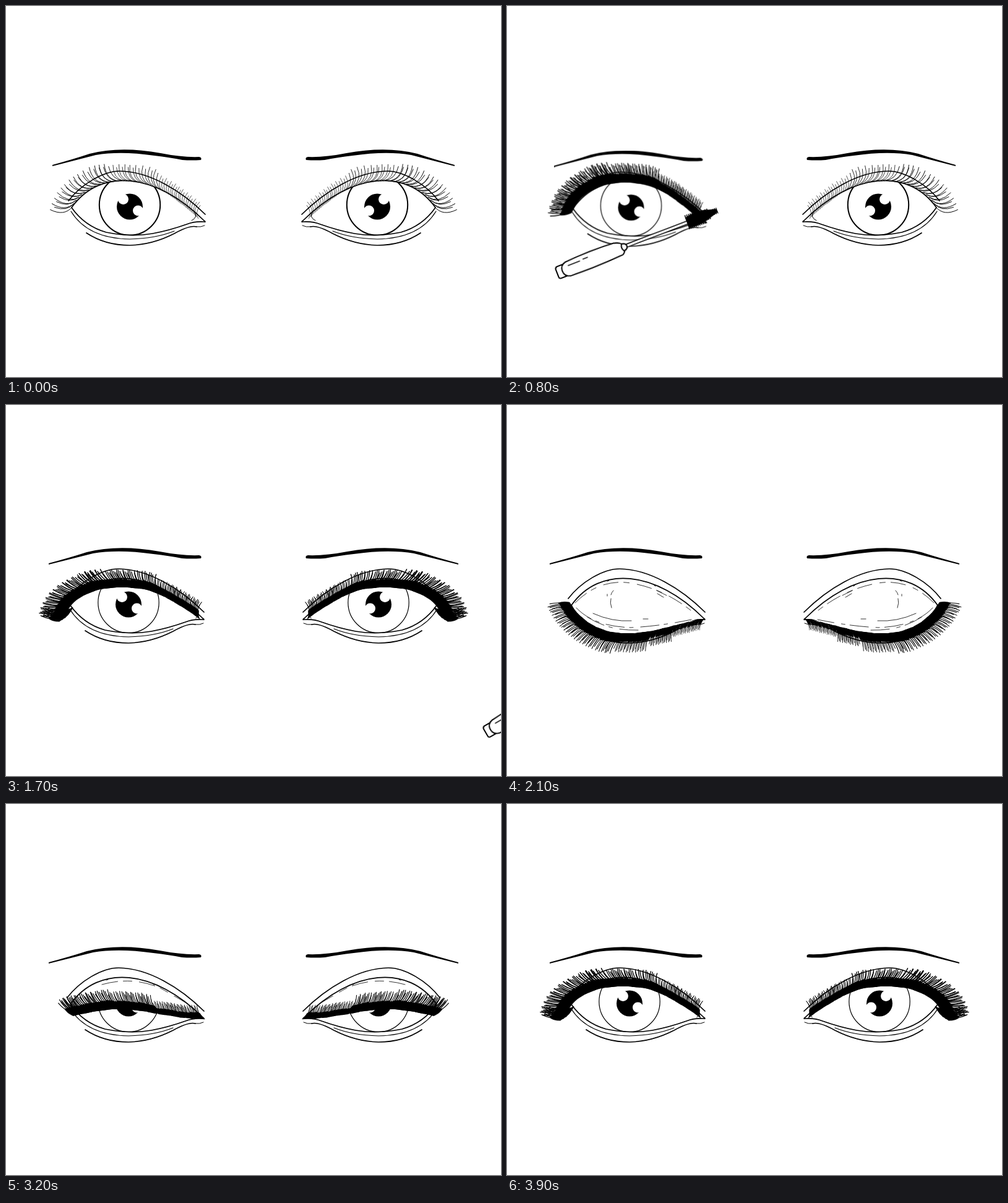
Write an HTML page without scripts that moves like this. It is 800 px wide and 600 px high and loops after 4000 ms.

```html
<!DOCTYPE html>
<html lang="en">
<head>
<meta charset="utf-8">
<title>Mascara</title>
<style>
html, body { margin: 0; width: 100%; height: 100%; overflow: hidden; background: #fff }
svg { display: block; width: 800px; height: 600px }
marker { overflow: visible }
.line { fill: none; stroke: #000; stroke-linecap: round; stroke-linejoin: round }
.skin { fill: #fff }
.bare { marker: url(#hair) }
.made { marker: url(#tuft) }
.long { marker: url(#plume) }
.down { marker: url(#drop) }

.nudge, .brow, .eye, .ball, .paint, .wand, .pose { animation: 4s step-end infinite }
.nudge { animation-name: nudge }
.brow { animation-name: brow; transform-origin: 315px 245px }
.eye { animation-name: eye }
.ball { animation-name: thin-late }
.nudge .ball { animation-name: thin-early }
.wand { animation-name: wand }
.start { animation-name: start }
.wide { animation-name: wide }
.mid { animation-name: mid }
.half { animation-name: half }
.low { animation-name: low }
.shut { animation-name: shut }
.paint.l { animation-name: paint-l; transform-origin: 50px 0 }
.paint.r { animation-name: paint-r; transform-origin: 340px 0 }

@keyframes nudge { 0%, 37.5% { transform: none } 5% { transform: translate(.5px, 1.5px) } }
@keyframes brow {
  0% { transform: none }
  37.5%, 97.5% { transform: translateY(-1px) scaleX(1.025) }
  95% { transform: translateY(-8px) scaleX(1.025) }
}
@keyframes eye { 0% { transform: translate(2px, 2px) } 37.5% { transform: none } }
@keyframes thin-early { 0% { stroke-width: 2 } 5% { stroke-width: 1.2 } }
@keyframes thin-late { 0% { stroke-width: 2 } 37.5% { stroke-width: 1.2 } }
@keyframes paint-l {
  0% { transform: scaleX(0) }
  5% { transform: scaleX(0); animation-timing-function: steps(6) }
  20%, 100% { transform: none }
}
@keyframes paint-r {
  0% { transform: scaleX(0) }
  25% { transform: scaleX(0); animation-timing-function: steps(5) }
  37.5%, 100% { transform: none }
}
@keyframes start { 0% { opacity: 1 } 37.5% { opacity: 0 } }
@keyframes wide { 0%, 47.5%, 75% { opacity: 0 } 37.5%, 65%, 97.5% { opacity: 1 } }
@keyframes mid {
  0%, 65%, 80%, 97.5% { opacity: 0; transform: none }
  62.5%, 75%, 95% { opacity: 1; transform: none }
  77.5% { opacity: 1; transform: translateY(6px) }
}
@keyframes half { 0%, 50%, 62.5%, 82.5%, 95% { opacity: 0 } 47.5%, 60%, 80%, 92.5% { opacity: 1 } }
@keyframes low { 0%, 52.5%, 60%, 85%, 92.5% { opacity: 0 } 50%, 57.5%, 82.5%, 90% { opacity: 1 } }
@keyframes shut { 0%, 57.5%, 90% { opacity: 0 } 52.5%, 85% { opacity: 1 } }
@keyframes wand {
  0%, 45% { transform: translate(-400px, 500px) }
  5% { transform: translate(45px, 325px) rotate(-21.4deg) }
  7.5% { transform: translate(95px, 312px) rotate(-21.4deg) }
  10% { transform: translate(130px, 295px) rotate(-21.4deg) }
  12.5% { transform: translate(175px, 280px) rotate(-21.4deg) }
  15% { transform: translate(222px, 282px) rotate(-21.4deg) }
  17.5% { transform: translate(265px, 298px) rotate(-21.4deg) }
  20% { transform: translate(339px, 331px) rotate(-21.4deg) }
  22.5% { transform: translate(298px, 345px) rotate(-21.4deg) }
  25% { transform: translate(440px, 350px) rotate(-21.4deg) }
  27.5% { transform: translate(520px, 325px) rotate(-21.4deg) }
  30% { transform: translate(610px, 290px) rotate(-21.4deg) }
  32.5% { transform: translate(690px, 295px) rotate(-21.4deg) }
  35% { transform: translate(735px, 320px) rotate(-22deg) }
  37.5% { transform: translate(800px, 345px) rotate(-24deg) }
  40% { transform: translate(900px, 370px) rotate(-27deg) }
  42.5% { transform: translate(1015px, 391px) rotate(-30deg) }
}
</style>
</head>
<body>
<svg viewBox="0 0 800 600">
<defs>
  <!-- Lashes grow from every vertex of a lid path; stroke-width sets their length. -->
  <marker id="hair" orient="auto">
    <path class="line" stroke-width=".8" d="M0 0Q-18-4-18-27M5 0Q-10-4-12-23"/>
  </marker>
  <g id="clump">
    <path d="M7 1H-8Q-17-6-19-14L-6-13z"/>
    <path class="line" stroke-width="1.200" d="M7 0Q-12-6-20-28M3 0Q-16-5-26-25M5 0Q-12-9-16-31M0 0Q-16-7-23-30M8 0Q-8-5-14-24"/>
  </g>
  <marker id="tuft" orient="auto"><use href="#clump"/></marker>
  <marker id="plume" orient="auto"><use href="#clump" transform="scale(1.15 1.1)"/></marker>
  <marker id="drop" orient="auto"><use href="#clump" transform="scale(.85 -1.08)"/></marker>

  <g id="lid" fill="none">
    <path stroke-width="1.100" d="M107 325 110 319 114 314 118 309 123 305 128 301 134 297 140 294 146 291 153 288 160 286 167 285 174 284 182 283"/>
    <path stroke-width=".95" d="M190 283 198 283 206 284 214 285 222 286 230 288 238 291 246 295"/>
    <path stroke-width=".75" d="M253 299 260 303 267 308 273 312 279 317 285 321 291 326 297 331 303 336 308 341"/>
  </g>
  <g id="lid-half" fill="none">
    <path d="M116 340 120 339 126 338 132 337 140 335 148 334 156 333 164 332 172 331 180 331"/>
    <path stroke-width=".88" d="M188 331 196 331 204 332 212 333 220 334 228 335 236 337 244 338"/>
    <path stroke-width=".65" d="M252 340 260 341 267 342 273 343 279 344 285 345 291 345 297 346 303 346 309 346 316 347"/>
  </g>
  <g id="lid-shut" fill="none">
    <path d="M104 325 108 331 113 337 118 342 124 347 130 352 137 356 144 360 152 363 160 366 168 368 176 369 184 370"/>
    <path stroke-width=".88" d="M192 370 200 370 208 370 216 369 224 368 232 367"/>
    <path stroke-width=".68" d="M240 365 248 363 255 361 261 360 267 358"/>
    <path stroke-width=".48" d="M273 357 279 355 285 354 291 352 297 351 303 349 309 348 315 347"/>
  </g>

  <path id="brow" d="M75 257Q108 248 135 239Q185 226 250 238Q285 245 312 244Q317 245 315 249Q300 250 285 249Q265 245 240 242Q185 234 145 241Q110 250 75 259z"/>
  <clipPath id="opening"><path d="M104 324C150 260 240 268 318 345L270 358Q200 380 150 360z"/></clipPath>
  <g id="ball" clip-path="url(#opening)">
    <circle fill="none" stroke="#000" cx="198" cy="319.500" r="49.200"/>
    <circle cx="198" cy="322.500" r="21"/>
    <g fill="#fff"><circle cx="187.500" cy="310.500" r="8.500"/><circle cx="211.500" cy="329" r="8.500"/></g>
  </g>
  <g id="lines" class="line" stroke-width="1.700">
    <path d="M104 324C150 259 240 267 318 345Q322 348 318 347Q302 346 290 351Q262 361 235 366Q200 372 160 364Q125 354 104 324"/>
    <path d="M99 313C120 286 155 265 182 265C230 265.500 282 297 320 335"/>
    <path stroke-width="1.200" d="M103 330Q130 374 198 375Q240 374 270 362"/>
    <path d="M128 365Q158 385 198 385Q235 384 270 366Q295 352 306 355"/>
    <path stroke-width="1" d="M306 355Q313 356 319 353"/>
  </g>

  <g id="tear" class="line" stroke-width="1"><path d="M303 331Q312 341 300 347"/></g>
  <g id="wide">
    <use class="long" href="#lid" transform="matrix(1.03 0 0 .82 -9.500 62)"/>
    <path class="made" fill="none" d="M92 345 96 342 100 338 103 334"/>
    <path class="line" d="M306 331Q313 338 307 345"/>
  </g>
  <g id="mid">
    <path class="skin" d="M108 324C150 262 240 270 312 342Q200 277 108 324"/>
    <use class="long" href="#lid" transform="matrix(1.03 0 0 .55 -10 156)"/>
  </g>
  <g id="half">
    <path class="skin" d="M107 324C150 262 240 270 312 342Q200 317 107 332"/>
    <path class="line" stroke-width=".8" stroke-dasharray="26 9 14 12" d="M155 292Q205 278 250 298Q280 315 300 327"/>
    <use class="made" href="#lid-half"/>
  </g>
  <g id="low">
    <path class="skin" d="M106 324C150 262 240 270 314 344Q200 368 106 328"/>
    <path class="line" stroke-width=".8" stroke-dasharray="26 9 14 12" d="M125 305Q190 268 250 300T305 337"/>
    <use class="down" href="#lid-shut" transform="matrix(1 0 0 .55 0 148)"/>
  </g>
  <g id="shut">
    <path class="skin" d="M106 324C150 262 240 270 314 344Q262 362 200 370Q130 368 106 327"/>
    <g class="line" stroke-width=".8">
      <path d="M168 313Q166 320 169 328M172 300Q169 303 168 307M162 306V309M139 337Q170 351 201 349M220 346H228M242 300 258 308M243 305 253 311"/>
      <path stroke-dasharray="24 9 9 13" d="M110 320Q150 280 200 288Q255 297 303 337"/>
      <path stroke-dasharray="30 8 6 12" d="M112 328Q140 358 200 360Q245 358 298 347M130 343Q165 366 215 364"/>
    </g>
    <use class="down" href="#lid-shut"/>
  </g>

  <clipPath id="done-l"><rect class="paint l" x="50" y="200" width="290" height="200"/></clipPath>
  <clipPath id="done-r"><rect class="paint r" x="50" y="200" width="290" height="200"/></clipPath>
</defs>

<rect width="800" height="600" fill="#fff"/>

<g class="nudge">
  <g class="brow"><use href="#brow"/></g>
  <g class="eye"><g class="ball"><use href="#ball"/></g><use href="#lines"/></g>
  <g class="pose start">
    <use href="#tear"/>
    <use class="bare" href="#lid"/>
    <g clip-path="url(#done-l)"><use class="made" href="#lid"/></g>
  </g>
</g>
<g transform="matrix(-1 0 0 1 800 0)">
  <g class="brow"><use href="#brow"/></g>
  <g class="eye"><g class="ball"><use href="#ball"/></g><use href="#lines"/></g>
  <g class="pose start">
    <use href="#tear"/>
    <use class="bare" href="#lid"/>
    <g clip-path="url(#done-r)"><use class="made" href="#lid"/></g>
  </g>
</g>

<g class="pose wide"><use href="#wide"/><use href="#wide" transform="matrix(-1 0 0 1 800 0)"/></g>
<g class="pose mid"><use href="#mid"/><use href="#mid" transform="matrix(-1 0 0 1 800 0)"/></g>
<g class="pose half"><use href="#half"/><use href="#half" transform="matrix(-1 0 0 1 800 0)"/></g>
<g class="pose low"><use href="#low"/><use href="#low" transform="matrix(-1 0 0 1 800 0)"/></g>
<g class="pose shut"><use href="#shut"/><use href="#shut" transform="matrix(-1 0 0 1 800 0)"/></g>

<!-- The origin is the tip of the brush. -->
<g class="wand">
  <g class="line" stroke-width="2" style="fill:#fff">
    <path stroke-width="1.500" d="M-160-3-50-2V3L-160 2z"/>
    <path d="M-262-10H-274Q-277-9-277-6V7Q-277 10-273 10H-262z"/>
    <path d="M-258-12Q-215-15-175-12Q-162-9-161-2Q-160 7-167 11Q-210 14-258 12Q-268 10-268 0Q-268-10-258-12z"/>
    <path d="M-163-6Q-156-5-156 0T-163 6Q-167 0-163-6z"/>
    <path stroke-width="1.500" d="M-256-5H-236M-230-6H-222"/>
  </g>
  <path d="M-52-8Q-30-13-14-7L0-3V3L-14 7Q-30 13-52 10z"/>
  <g class="line" style="stroke-linecap:butt" stroke-dasharray="1.500 1.500">
    <path stroke-width="24" d="M-52 0-24 1"/>
    <path stroke-width="18" d="M-24 0H-12"/>
    <path stroke-width="10" d="M-12 0H1"/>
  </g>
</g>
</svg>
</body>
</html>
```
